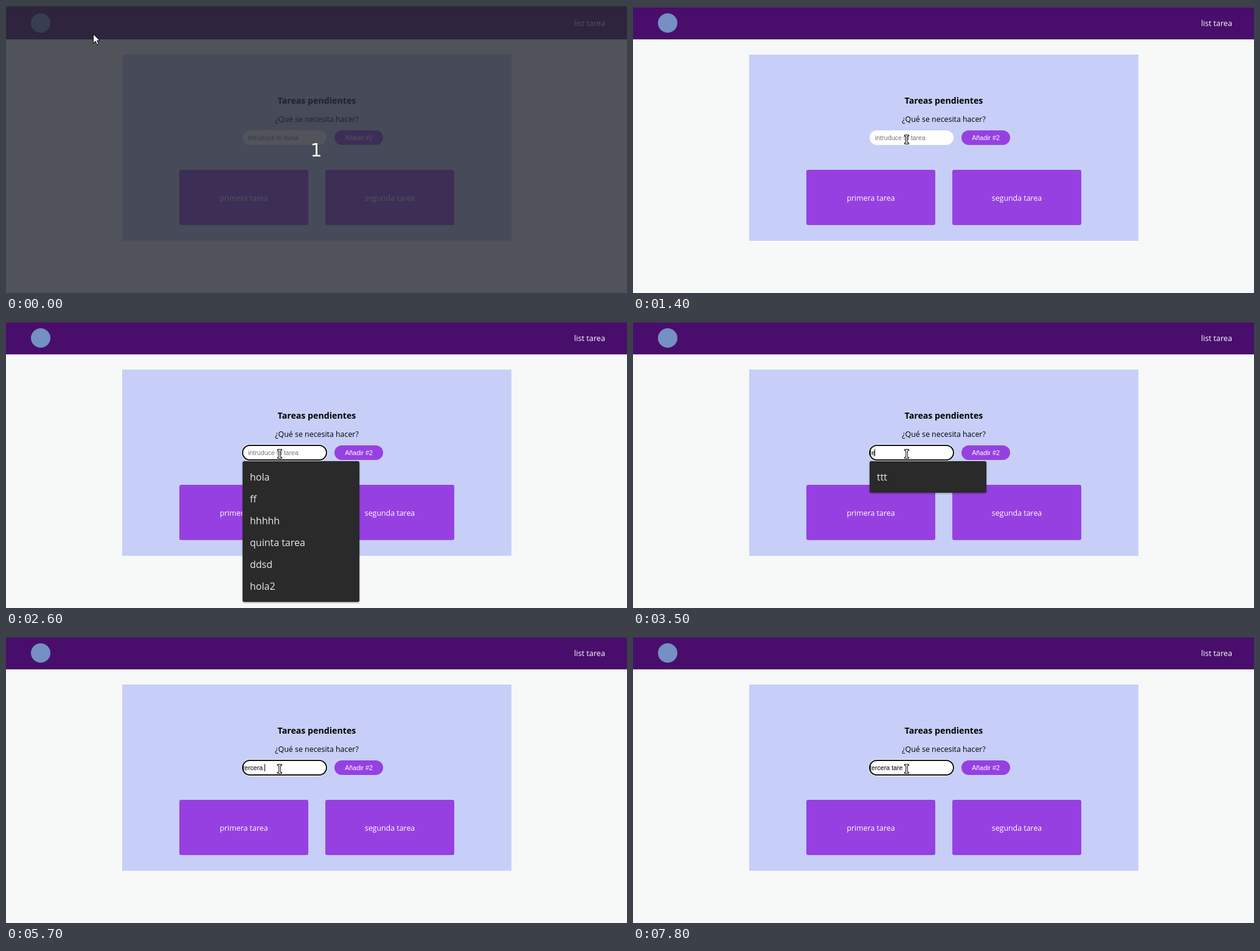
An HTML page for the animation above (8 s loop, 1021x473 px).

```html
<!DOCTYPE html>
<html lang="es">
<head>
<meta charset="utf-8">
<title>Tareas pendientes</title>
<style>
  html, body { margin: 0; width: 100%; height: 100%; overflow: hidden; background: #f7f9f8; }
  svg { display: block; }
  text { font: 12.4px "Open Sans", "Noto Sans", sans-serif; }
  .mid { text-anchor: middle; }
  .light { fill: #fff; }
  .field { font: 10.667px "Liberation Sans", Arial, sans-serif; white-space: pre; }
  .option { font-size: 16px; font-weight: 500; fill: #e8eaed; }
</style>
</head>
<body>
<svg width="1021" height="473" viewBox="0 0 1021 473">
  <defs>
    <clipPath id="inputClip"><rect x="389" y="205" width="138" height="24"/></clipPath>
    <filter id="shadow" x="-10%" y="-10%" width="120%" height="125%">
      <feDropShadow dx="0" dy="1" stdDeviation="1.5" flood-opacity=".4"/>
    </filter>
  </defs>

  <rect width="1021" height="473" fill="#f7f9f8"/>
  <rect width="1021" height="55" fill="#490e6c"/>
  <rect y="1" width="1021" height="1" fill="#46604a"/>
  <circle cx="57" cy="28" r="16" fill="#7590c2"/>
  <text x="985" y="33" text-anchor="end" class="light" style="font-size:12.7px">list tarea</text>

  <rect x="191" y="80" width="640" height="307" fill="#c7cff8"/>
  <text x="511" y="161" class="mid" style="font-size:14.2px;font-weight:700">Tareas pendientes</text>
  <text x="511" y="191" class="mid">¿Qué se necesita hacer?</text>

  <g fill="#9640e2">
    <rect x="540" y="205" width="80" height="24" rx="12"/>
    <rect x="285" y="270" width="212" height="91" rx="3"/>
    <rect x="525" y="270" width="212" height="91" rx="3"/>
  </g>
  <text x="580" y="221" class="field mid light">Añadir #2</text>
  <text x="391" y="321" class="mid light">primera tarea</text>
  <text x="631" y="321" class="mid light">segunda tarea</text>

  <rect x="389" y="205" width="138" height="24" rx="12" fill="#fff"/>
  <text id="hint" x="398" y="221" class="field" fill="#757575">intruduce tu tarea</text>
  <g id="entry" clip-path="url(#inputClip)">
    <text id="typed" x="389" y="221" class="field"></text>
    <rect id="caret" y="211" width="1" height="12"/>
  </g>
  <g id="ring" fill="none">
    <rect x="387.5" y="203.5" width="141" height="27" rx="13.5" stroke="#fff"/>
    <rect x="389" y="205" width="138" height="24" rx="12" stroke="#101010" stroke-width="2"/>
  </g>

  <g id="menu">
    <rect id="menuBox" x="389" y="231" width="192" rx="3" fill="#292a2c" filter="url(#shadow)"/>
    <g id="options"></g>
  </g>

  <g id="countdown">
    <rect y="1" width="1021" height="472" fill="#272a33" fill-opacity=".8"/>
    <text x="510" y="248" class="mid light" style="font:30px 'DejaVu Sans',sans-serif">1</text>
  </g>
  <rect width="1021" height="1" fill="#2d2b30"/>

  <g id="pointer" fill="#fff" stroke="#000">
    <path id="arrow" d="M.6 1.2V16.3L4.2 13L6.7 18.8L9.2 17.7L6.7 12H11.2Z"/>
    <path id="beam" d="M-3.5 .5H3.5V2.5H1.3V13.5H3.5V15.5H-3.5V13.5H-1.3V2.5H-3.5Z"/>
  </g>
</svg>
<script>
const LOOP = 8000;
const $ = id => document.getElementById(id);

// [start ms, x, y]; the pointer jumps between positions
const moves = [
  [0, 143, 45], [200, 151, 55], [400, 184, 79], [600, 272, 119], [700, 356, 157],
  [900, 419, 183], [1100, 456, 230], [1300, 452, 222], [1400, 450, 212], [2600, 450, 211]
];
const BEAM_FROM = 1300, FOCUS_AT = 2100, CARET_OFF = 7800;

// [start ms, letters typed so far]
const phrase = "tercera tarea";
const strokes = [
  [0, 0], [3500, 2], [3800, 3], [4400, 4], [4600, 5], [5100, 6],
  [5700, 8], [6200, 9], [6300, 10], [6900, 11], [7200, 12]
];

const menus = [
  [0, []],
  [FOCUS_AT, ["hola", "ff", "hhhhh", "quinta tarea", "ddsd", "hola2"]],
  [3500, ["ttt"]],
  [3600, []]
];

const at = (list, t) => list.findLast(step => step[0] <= t);
const show = (id, on) => $(id).setAttribute("display", on ? "inline" : "none");

function drawMenu(items) {
  show("menu", items.length > 0);
  $("menuBox").setAttribute("height", items.length * 36 + 16);
  $("options").innerHTML = items
    .map((label, i) => `<text x="401" y="${263 + i * 36}" class="option">${label}</text>`)
    .join("");
}

function draw(t) {
  const [, x, y] = at(moves, t);
  $("pointer").setAttribute("transform", `translate(${x} ${y})`);
  show("arrow", t < BEAM_FROM);
  show("beam", t >= BEAM_FROM);
  show("countdown", t < 200);

  const count = at(strokes, t)[1];
  show("hint", count === 0);
  show("entry", count > 0);
  show("ring", t >= FOCUS_AT);
  show("caret", t < CARET_OFF);
  const typed = $("typed");
  typed.textContent = phrase.slice(0, count);
  if (count) $("caret").setAttribute("x", Math.floor(389 + typed.getComputedTextLength()));

  drawMenu(at(menus, t)[1]);
}

const start = performance.now();
function tick(now) {
  draw(Math.max(0, now - start) % LOOP);
  requestAnimationFrame(tick);
}
draw(0);
requestAnimationFrame(tick);
</script>
</body>
</html>
```
